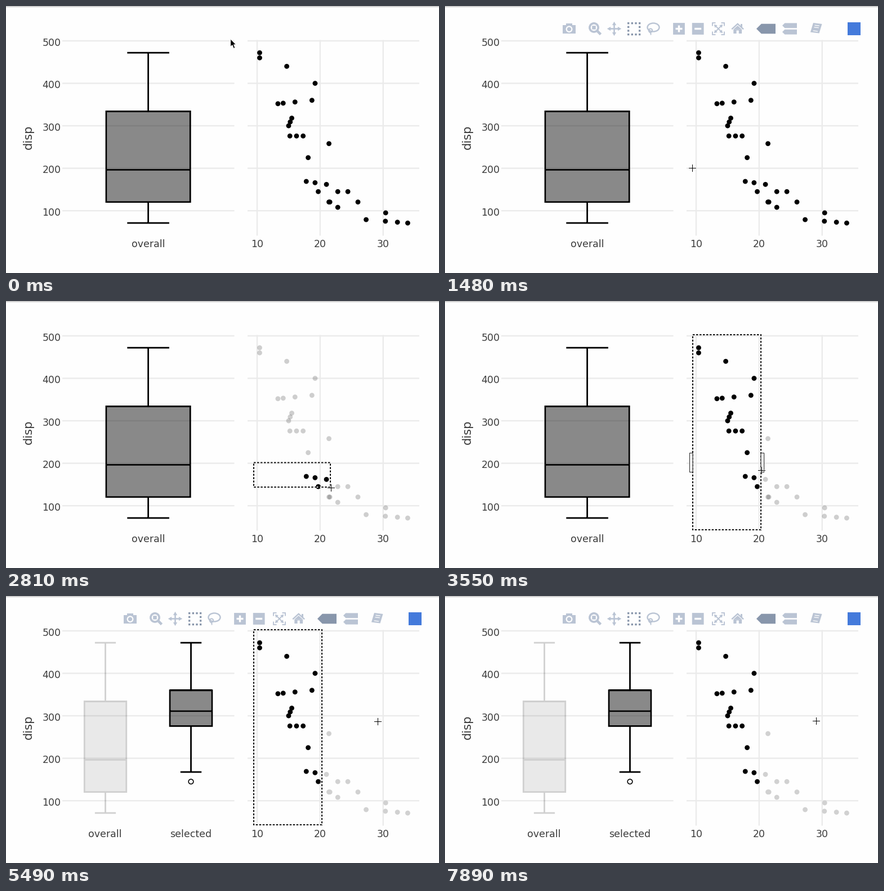
A matplotlib script that plays this animation: 769x475 px, repeating every 8000 ms.

```python
import numpy as np
import matplotlib.pyplot as plt
from matplotlib.animation import FuncAnimation
from matplotlib.collections import LineCollection
from matplotlib.patches import Circle, Ellipse, PathPatch, Polygon, Rectangle, RegularPolygon
from matplotlib.path import Path

plt.rcParams["path.snap"] = False

W, H, DPI = 769, 475, 64
PT = 72 / DPI                      # points per pixel
LOOP, TICK = 8000, 20
BG, GRID, INK = "#fefefe", "#ebebeb", "#3c3c3c"
ICON, ACTIVE = "#bac4d4", "#8896ab"
FADED = (0.82, 0.82, 0.82, 1)


def sx(mpg):
    return 446 + (mpg - 10) * 11.19


def sy(disp):
    return 62 + (500 - disp) * 0.7555


def row(x0, x1, y, n, ease=1.0, rise=0):
    """A run of n cars between two mileages, optionally bunched and tilted."""
    u = np.linspace(0, 1, n) ** ease
    return np.column_stack([x0 + (x1 - x0) * u, y + rise * u])


cars = np.vstack([
    row(10.4, 10.4, 472, 2, rise=-12),
    row(14.7, 19.2, 440, 2, rise=-40),
    row(13.3, 18.7, 352, 4, 1.7, rise=8),
    row(15, 15.5, 300, 3, rise=18),
    row(15.2, 17.3, 276, 3),
    row(18.1, 21.4, 225, 2, rise=33),
    row(17.8, 21, 169, 3, 1.2, rise=-7),
    row(19.7, 24.4, 145, 3, 0.6),
    row(21.4, 26, 120.5, 3, 5),
    row(22.8, 30.4, 108, 2, rise=-13),
    row(27.3, 33.9, 79, 4, 0.7, rise=-8),
])
px, py = sx(cars[:, 0]), sy(cars[:, 1])

fig = plt.figure(figsize=(W / DPI, H / DPI), dpi=DPI, facecolor=BG)
ax = fig.add_axes([0, 0, 1, 1])
ax.set_xlim(0, W)
ax.set_ylim(H, 0)
ax.axis("off")


def add(patch, z=2):
    patch.set_zorder(z)
    return ax.add_patch(patch)


def poly(pts, color, z=2):
    return add(Polygon(pts, closed=True, fc=color, lw=0), z)


def rect(x, y, w, h, color, z=2):
    return add(Rectangle((x, y), w, h, fc=color, lw=0), z)


def square(x, y, size, color, z=2):
    return rect(x - size / 2, y - size / 2, size, size, color, z)


def disc(x, y, r, color, z=2):
    return add(Circle((x, y), r, fc=color, lw=0), z)


def ring(x, y, w, h, color, width, z=2):
    return add(Ellipse((x, y), w, h, fill=False, ec=color, lw=width * PT), z)


def head(x, y, r, angle, color):
    return add(RegularPolygon((x, y), 3, radius=r, orientation=angle - np.pi / 2, fc=color, lw=0))


def strokes(lines, color, width, z=2, alpha=None):
    """Several polylines as one stroke, so crossings do not darken."""
    path = Path.make_compound_path(*[Path(np.array(p, float)) for p in lines])
    return add(PathPatch(path, fill=False, ec=color, lw=width * PT, alpha=alpha,
                         capstyle="butt", joinstyle="miter"), z)


def plus(x, y, r):
    return [[(x - r, y), (x + r, y)], [(x, y - r), (x, y + r)]]


def label(x, y, s, size=17.4, color=INK, font="DejaVu Sans", z=3, **kw):
    return ax.text(x, y, s, fontsize=size * PT, color=color, family=font,
                   va="baseline", zorder=z, **kw)


def show(artists, on):
    for a in artists:
        a.set_visible(on)


# page edge, grid and axis labels
rect(0, 0, W, 1, "#dcdcdc")
rect(0, 1, W, 1, "#c0c0c0")
grid = []
for d in range(100, 501, 100):
    y = sy(d)
    grid += [[(100, y), (405.5, y)], [(429, y), (734, y)]]
    label(97.3, y + 8.8, str(d), ha="right")
for m in (10, 20, 30):
    grid.append([(sx(m), 60.5), (sx(m), 408.5)])
    label(sx(m), 429, str(m), ha="center")
ax.add_collection(LineCollection(grid, colors=GRID, linewidths=2.4 * PT, zorder=1))
label(45.7, 233.5, "disp", 21, ha="center", rotation=90, rotation_mode="anchor")


def boxplot(name, cx, half, stats, alpha=1.0):
    lo, q1, med, q3, hi = (sy(v) for v in stats)
    l, r, cap, g = cx - half, cx + half, half / 2, 1.3
    parts = []
    for top, bottom in ((q3, med), (med, q1)):
        parts.append(rect(l + g, top + g, r - l - 2 * g, bottom - top - 2 * g, "black"))
        parts[-1].set_alpha(0.457 * alpha)
    lines = [[(l, q3), (r, q3), (r, q1), (l, q1), (l, q3), (r, q3)], [(l, med), (r, med)]]
    for inner, outer in ((q3, hi), (q1, lo)):
        lines += [[(cx, inner), (cx, outer)], [(cx - cap, outer), (cx + cap, outer)]]
    parts.append(strokes(lines, "black", 2.8, 3, alpha))
    parts.append(label(cx - 0.3, 429, name, ha="center"))
    return parts


ALL = (71.1, 120.6, 196.3, 334, 472)
before = boxplot("overall", 252.6, 74.6, ALL)
after = boxplot("overall", 176.5, 37.2, ALL, 0.18)
after += boxplot("selected", 328.5, 37.4, (167.6, 275.8, 311, 360, 472))
after.append(ring(328.5, sy(145), 8.6, 8.6, "black", 1.6, 3))

dots = ax.scatter(px, py, s=(8.8 * PT) ** 2, c="black", linewidths=0, zorder=4)

# selection outline and its side handles
dash = (0, (3.5 / 1.9, 2.5 / 1.9))
outline = [add(Rectangle((0, 0), 1, 1, fill=False, ec=c, lw=1.9 * PT, ls=ls), 6)
           for c, ls in (("white", "-"), ("black", dash))]
handles = [add(Rectangle((0, 270.5), 5.5, 34, fc="white", ec=INK, lw=1.2 * PT), 7)
           for _ in range(2)]


def hover_label(x, y, w, h, nose):
    l, r, t, b = x - nose - w, x - nose, y - h / 2, y + h / 2
    shape = [(l, t), (r, t), (r, y - nose), (x, y), (r, y + nose), (r, b), (l, b)]
    font = dict(size=19.4, font="Liberation Sans", z=9)
    return [add(Polygon(shape, fc="black", ec="white", lw=1.4 * PT), 8),
            label((l + r) / 2, y + 7.2, "(19.2, 167.6)", color="white", ha="center", **font),
            label(l - 6, y + 7.2, "selected", color="black", ha="right", **font)]


tip = hover_label(544, 312.8, 115, 28.5, 8.5)


def toolbar(mid=40.5):
    top = mid - 11.5
    b = []

    # camera
    x = 220.5
    b += [rect(x - 11.5, 34, 23, 15, ICON), rect(x - 5.5, 31, 11, 4, ICON),
          disc(x, 41.2, 5.9, BG, 3), disc(x, 41.2, 3.7, ICON, 4)]

    # magnifier
    x = 264.5
    b += [ring(x, 38.4, 15.2, 15.2, ICON, 3.6), square(x, 38.4, 6.5, ICON),
          strokes([[(x + 5, mid + 3), (x + 12, mid + 10)]], ICON, 4.6)]

    # four-way arrow
    x = 300.5
    b.append(strokes(plus(x, mid, 8), ICON, 2.6))
    for a in np.arange(4) * np.pi / 2:
        b.append(head(x + 8.5 * np.cos(a), mid + 8.5 * np.sin(a), 4.2, a, ICON))

    # dotted square, seven cells wide
    cell = 23.3 / 7
    for i in range(0, 7, 2):
        for j in range(0, 7, 2):
            if i in (0, 6) or j in (0, 6):
                b.append(rect(324 + i * cell, top + j * cell, cell, cell, ACTIVE))

    # lasso
    x = 370
    b += [ring(x, 38, 21, 15, ICON, 2.4), ring(x - 5, 43.6, 6.4, 6.4, ICON, 2),
          strokes([[(x - 7, 46), (x - 4.5, 48.5), (x - 4.5, 51.5)]], ICON, 1.9)]

    # plus and minus
    for x, bars in ((415.5, 2), (449.2, 1)):
        b += [square(x, mid, 20.8, ICON), strokes(plus(x, mid, 6)[:bars], BG, 3.4, 3)]

    # autoscale: a cross with arrowheads inside four corners
    x, lines = 485.5, []
    for u in (-1, 1):
        for v in (-1, 1):
            cx, cy = x + 10.5 * u, mid + 10.5 * v
            lines += [[(cx - 5.5 * u, cy), (cx, cy), (cx, cy - 5.5 * v)],
                      [(x, mid), (x + 5 * u, mid + 5 * v)]]
            b.append(head(x + 5.2 * u, mid + 5.2 * v, 3.6, np.arctan2(v, u), ICON))
    b.append(strokes(lines, ICON, 1.9))

    # house
    x = 519.7
    b += [strokes([[(x - 10.4, 41.3), (x, 31.8), (x + 10.4, 41.3)]], ICON, 2.4),
          poly([(x - 7.4, 41.5), (x, 35), (x + 7.4, 41.5)], ICON),
          rect(x - 7.4, 41.5, 14.8, 7.5, ICON), rect(x - 2.1, 43.5, 4.2, 5.5, BG, 3),
          rect(x + 5.3, 32, 3, 6, ICON)]

    # one big tag, two small ones
    for x, y, w, h, color in ((553, mid, 34, 8.8, ACTIVE), (599, 34.8, 26, 4.4, ICON),
                              (599, 46.2, 26, 4.4, ICON)):
        b.append(poly([(x, y), (x + h, y - h), (x + w, y - h),
                       (x + w, y + h), (x + h, y + h)], color))

    # notebook
    b.append(poly([(654, 30), (669.5, 32), (664.5, 48.5), (649, 46.5)], ICON))
    b.append(strokes([[(656.5 - k, 34.2 + 3.5 * k), (664.8 - k, 35.2 + 3.5 * k)]
                      for k in (0, 1, 2.8)], BG, 1.3, 3))
    b.append(square(726.5, mid, 23, "#447adb"))
    return b


bar = toolbar()

# pointers, drawn around their hot spot
ARROW = np.array([(0, 0), (0, 14), (3.2, 11.2), (5.6, 17), (8.2, 15.9), (5.8, 10.3), (10, 10.3)])
arrow = add(Polygon(ARROW, fc="black", ec="white", lw=PT), 12)
halo, = ax.plot([], [], color="white", lw=2.6 * PT, zorder=11, solid_capstyle="butt", alpha=0.7)
cross, = ax.plot([], [], color="black", lw=PT, zorder=12, solid_capstyle="butt")

# pointer moves: start time, steps, where it ends
PACE = 147.3
HOME, DROP = (398.7, 58.5), (562.5, 301.5)
MOVES = [(150, 4, 466, 259), (1040, 4, 439.5, 288.5), (1930, 7, 577.5, 332.5),
         (2960, 5, *DROP), (4000, 3, *DROP), (5200, 3, 660.5, 223.5), (7740, 2, 659.5, 222.5)]
_, HOVER, DRAG, _, DONE, LEAVE, CLEAR = (m[0] for m in MOVES)
CORNER = (440, 287.5)


def pointer(now):
    """Time of the latest step and the pointer's place after it."""
    t, x, y = 0, *HOME
    for start, n, x1, y1 in MOVES:
        done = sum(round((start + i * PACE) / 10) * 10 <= now for i in range(n))
        if not done:
            break
        k = 1 - (1 - done / n) ** 1.5
        t = start + (done - 1) * PACE
        x, y = x + (x1 - x) * k, y + (y1 - y) * k
    return t, x, y


def selection(now):
    """Selected box, and whether it spans the full height."""
    _, cx, cy = pointer(min(now, DONE - 1))
    x1, y1 = cx - 1.4, cy - 1.4
    dx, dy = x1 - CORNER[0], y1 - CORNER[1]
    if dy < min(dx * 0.6, 17):
        return CORNER[0], 60, x1, 407, True
    return *CORNER, x1, y1, False


def bar_alpha(t):
    for start, end in ((HOVER, DRAG), (DONE + PACE, LOOP)):
        if start <= t < end:
            return 0.5 if t < start + PACE / 2 else 1
    return 0


def update(k):
    now = k * TICK + TICK / 2
    t, cx, cy = pointer(now)
    early, active, done = t < HOVER, t >= DRAG, t >= DONE

    arrow.set_visible(early)
    arrow.set_xy(ARROW + (cx, cy))
    mx, my = np.floor(cx) + 0.5, np.floor(cy) + 0.5
    for line, r in ((halo, 7), (cross, 6.5)):
        line.set_visible(not early)
        line.set_data([mx - r, mx + r, np.nan, mx, mx], [my, my, np.nan, my - r, my + r])

    show(before, not done)
    show(after, done)
    show(tip, done and t < LEAVE)

    a = bar_alpha(t)
    show(bar, a > 0)
    for p in bar:
        p.set_alpha(a)

    x0, y0, x1, y1, wide = selection(now)
    colors = np.tile((0.0, 0.0, 0.0, 1.0), (len(px), 1))
    if active:
        out = (px < x0) | (px > x1) | (py < y0) | (py > y1)
        colors[out] = FADED if done else (0, 0, 0, 0.19)
    dots.set_facecolors(colors)

    show(outline, active and t < CLEAR)
    for o in outline:
        o.set_bounds(x0, y0, x1 - x0, y1 - y0)
    show(handles, active and wide and not done)
    handles[0].set_x(x0 - 5.5)
    handles[1].set_x(x1)
    return [dots]


anim = FuncAnimation(fig, update, frames=LOOP // TICK, interval=TICK,
                     repeat=True, repeat_delay=0, blit=False)
plt.show()
```
